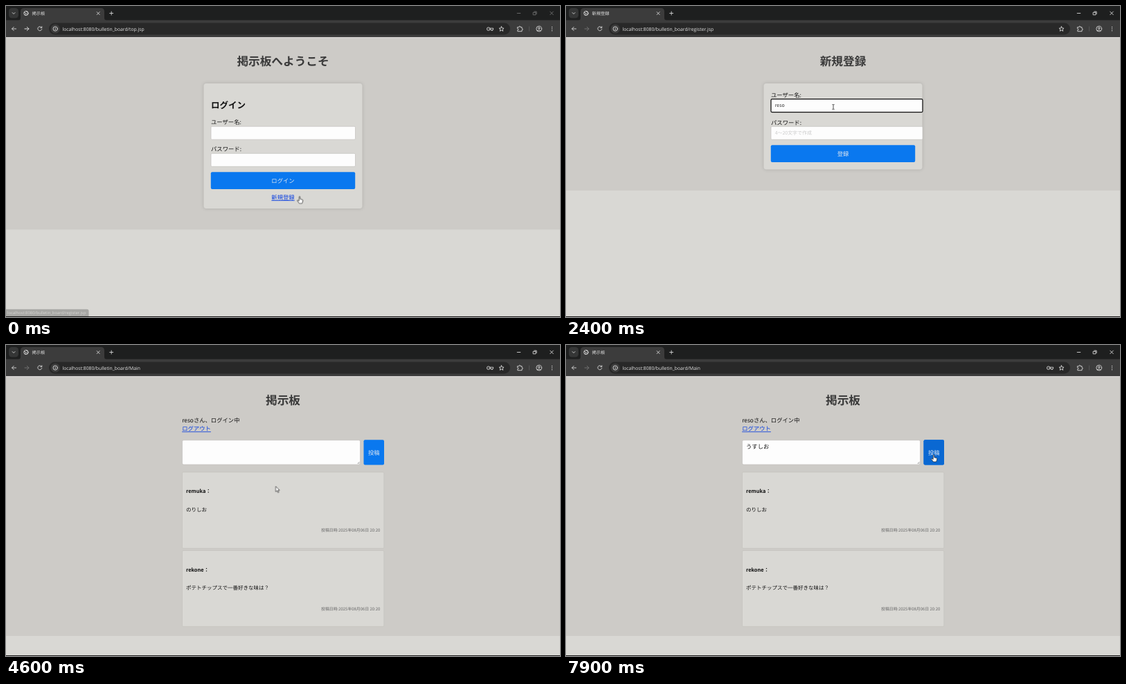
Animation of 800x450 px, one loop 8000 ms. Source, as an HTML page:

```html
<!DOCTYPE html>
<html>
<head>
<meta charset="utf-8">
<title>掲示板</title>
<style>
html, body { margin: 0; width: 100%; height: 100%; overflow: hidden; background: #d9d8d4; }
svg { display: block; width: 800px; height: 450px; }
text { font: 8.33px "Noto Sans CJK JP", "Noto Sans CJK", sans-serif; fill: #111; text-rendering: geometricPrecision; white-space: pre; }
.mid { text-anchor: middle; }
.h1 { font-size: 16.67px; font-weight: 700; fill: #3a3a3a; text-anchor: middle; }
.h2 { font-size: 12.5px; font-weight: 700; }
.tab { font-size: 6.25px; fill: #dedede; }
.url { font: 6.8px "Open Sans", "Noto Sans", sans-serif; fill: #e4e4e4; }
.tip { font-size: 5.87px; fill: #c8c8c8; }
.link { fill: #0a3fe0; text-decoration: underline; }
.label { fill: #e2e8f0; text-anchor: middle; }
.small { font-size: 6.94px; fill: #333; }
.hint { font-size: 6.94px; fill: #cbcbcb; }
.post { font-size: 7.5px; }
.name { font-size: 7.5px; font-weight: 700; }
.date { font-size: 5.92px; fill: #666; text-anchor: end; }
.shade { fill: #cdcbc7; }
.card { fill: #d9d8d4; filter: drop-shadow(0 0 2.6px rgba(0,0,0,.15)); }
.item { fill: #d9d8d4; stroke: #c1bfbb; stroke-width: .6; }
.box { fill: #fdfdfd; stroke: #c3c1bd; stroke-width: .7; }
.ring { fill: none; stroke: #101010; stroke-width: 1.2; }
.btn { fill: #0a78ef; }
.hov { fill: #0a68d2; }
.ico { fill: none; stroke: #d6d6d6; stroke-width: .9; stroke-linecap: round; stroke-linejoin: round; }
.ptr { fill: #fff; stroke: #222; stroke-width: .7; stroke-linejoin: round; }

/* one shared 8 s clock; each step lands just before its tenth of a second */
.k { animation: 8s step-end -30ms infinite; }
.move { animation: move 8s linear -30ms infinite; }
.tip-on { animation: tip 8s linear -30ms infinite; }

@keyframes top { 0% { opacity: 1 } 5%, to { opacity: 0 } }
@keyframes reg { 0% { opacity: 0 } 5% { opacity: 1 } 52.5%, to { opacity: 0 } }
@keyframes main { 0% { opacity: 0 } 52.5%, to { opacity: 1 } }
@keyframes wake { 0% { stroke: #707070 } 1.25%, to { stroke: #d6d6d6 } }
@keyframes key { 0% { opacity: 1 } 20% { opacity: 0 } 38.75%, to { opacity: 1 } }
@keyframes tip { 0% { opacity: 0 } 1.25%, 10% { opacity: 1 } 11.25%, to { opacity: 0 } }

@keyframes nameFocus { 0% { opacity: 0 } 15% { opacity: 1 } 37.5%, to { opacity: 0 } }
@keyframes nameCaret { 0% { opacity: 0 } 15% { opacity: 1; transform: none } 20% { opacity: 1; transform: translateX(3px) } 21.25%, to { opacity: 0 } }
@keyframes nameHint { 0% { opacity: 1 } 20%, to { opacity: 0 } }
@keyframes n1 { 0% { fill-opacity: 0 } 20%, to { fill-opacity: 1 } }
@keyframes n2 { 0% { fill-opacity: 0 } 21.25%, to { fill-opacity: 1 } }
@keyframes n3 { 0% { fill-opacity: 0 } 25%, to { fill-opacity: 1 } }
@keyframes n4 { 0% { fill-opacity: 0 } 26.25%, to { fill-opacity: 1 } }
@keyframes passFocus { 0% { opacity: 0 } 37.5%, to { opacity: 1 } }
@keyframes passHint { 0% { opacity: 1 } 38.75%, to { opacity: 0 } }
@keyframes p1 { 0% { opacity: 0 } 38.75%, to { opacity: 1 } }
@keyframes p2 { 0% { opacity: 0 } 40%, to { opacity: 1 } }
@keyframes p3 { 0% { opacity: 0 } 41.25%, to { opacity: 1 } }
@keyframes p4 { 0% { opacity: 0 } 42.5%, to { opacity: 1 } }
@keyframes regHover { 0% { opacity: 0 } 11.25% { opacity: 1 } 12.5% { opacity: 0 } 33.75% { opacity: 1 } 36.25% { opacity: 0 } 45%, to { opacity: 1 } }

@keyframes areaFocus { 0% { opacity: 0 } 63.75% { opacity: 1 } 98.75%, to { opacity: 0 } }
@keyframes k1 { 0% { opacity: 0 } 75%, to { opacity: 1 } }
@keyframes s2 { 0% { opacity: 0 } 76.25% { opacity: 1 } 77.5%, to { opacity: 0 } }
@keyframes k2 { 0% { opacity: 0 } 77.5%, to { opacity: 1 } }
@keyframes s3 { 0% { opacity: 0 } 78.75% { opacity: 1 } 81.25%, to { opacity: 0 } }
@keyframes k3 { 0% { opacity: 0 } 81.25%, to { opacity: 1 } }
@keyframes k4 { 0% { opacity: 0 } 83.75%, to { opacity: 1 } }
@keyframes compose {
  0% { width: 0 } 75% { width: 8.33px } 76.25% { width: 16.67px }
  78.75% { width: 25px } 83.75% { width: 33.3px } 92.5%, to { width: 0 }
}
@keyframes areaCaret {
  0% { opacity: 0 } 63.75% { opacity: 1; transform: none } 70% { opacity: 0 }
  75% { opacity: 1; transform: translateX(8.3px) } 76.25% { opacity: 1; transform: translateX(16.7px) }
  78.75% { opacity: 1; transform: translateX(25px) } 83.75% { opacity: 1; transform: translateX(33.3px) }
  86.25%, to { opacity: 0 }
}
@keyframes sendHover { 0% { opacity: 0 } 96.25%, to { opacity: 1 } }

@keyframes move {
  0% { transform: translate(428px, 275px) }
  1.25% { transform: translate(415px, 277px) }
  2.5%, 8.75% { transform: translate(406.5px, 278px) }
  10% { transform: translate(404px, 262px) }
  11.25% { transform: translate(398px, 213px) }
  12.5% { transform: translate(390px, 176px) }
  15%, 31.25% { transform: translate(386px, 146px) }
  32.5% { transform: translate(388px, 170px) }
  33.75%, 35% { transform: translate(391px, 212px) }
  36.25%, 43.75% { transform: translate(390px, 186px) }
  45%, 58.1% { transform: translate(389.5px, 204.5px) }
  60% { transform: translate(385px, 170px) }
  62.5%, 92.5% { transform: translate(377px, 149.5px) }
  96.25% { transform: translate(518px, 158px) }
  98.5%, to { transform: translate(531px, 159px) }
}
@keyframes hand {
  0% { opacity: 1 } 5% { opacity: 0 } 11.25% { opacity: 1 } 12.5% { opacity: 0 } 33.75% { opacity: 1 }
  36.25% { opacity: 0 } 45% { opacity: 1 } 52.5% { opacity: 0 } 96.25%, to { opacity: 1 }
}
@keyframes arrow { 0% { opacity: 0 } 5% { opacity: 1 } 11.25% { opacity: 0 } 52.5% { opacity: 1 } 60%, to { opacity: 0 } }
@keyframes beam {
  0% { opacity: 0 } 12.5% { opacity: 1 } 33.75% { opacity: 0 } 36.25% { opacity: 1 }
  45% { opacity: 0 } 60% { opacity: 1 } 96.25%, to { opacity: 0 }
}
</style>
</head>
<body>
<svg viewBox="0 0 800 450">
  <!-- browser frame -->
  <rect width="800" height="450" fill="#d9d8d4"/>
  <rect width="800" height="21" fill="#1e1f1f"/>
  <rect y="20.5" width="800" height="24.5" fill="#3c3c3c"/>
  <rect x="4" y="3" width="14" height="14.5" rx="4.5" fill="#353636"/>
  <path d="M17 21q4 0 4-4V8q0-5 5-5h111q5 0 5 5v9q0 4 4 4z" fill="#3c3c3c"/>
  <rect x="62" y="24.5" width="666" height="17" rx="8.5" fill="#282828"/>
  <circle cx="71.2" cy="33" r="6.6" fill="#3c3c3c"/>
  <g class="ico">
    <path d="M9.2 9.6l1.9 1.9 1.9-1.9M131.2 8.6l4 4m0-4l-4 4M149.7 10.5h5m-2.500-2.500v5"/>
    <circle cx="29" cy="10.500" r="3.200"/>
    <path d="M26.300 9.500q2.500 0 2.700 1.600t2.700.6M29.500 7.500q-.5 1.500 1.800 1.700M28 13.300v-1.500"/>
    <path d="M14.600 33H8.600m2.700-2.700L8.600 33l2.700 2.700"/>
    <path d="M51.500 31.300a3 3 0 1 0 .3 2.200M51.800 29.700v1.900h-1.900"/>
    <circle cx="71.200" cy="33" r="3.200"/>
    <path d="M71.200 32.800v1.700m0-3.200v.1"/>
    <path d="M715.500 29.700l1 2.300 2.500.2-1.900 1.600.6 2.500-2.200-1.300-2.200 1.300.6-2.500-1.900-1.600 2.500-.2z"/>
    <path d="M738.800 30.700h2q0-1.500 1-1.500t1 1.500h2.200v2q1.300 0 1.300 1t-1.300 1v2h-6.200v-2q1.300 0 1.300-1t-1.300-1z"/>
    <circle cx="769.700" cy="33" r="3.900"/>
    <circle cx="769.700" cy="32" r="1.200"/>
    <path d="M767.200 35.600q2.500-2 5 0"/>
    <path d="M788.500 30.300v.1m0 2.600v.1m0 2.600v.1" stroke-width="1.300"/>
  </g>
  <path d="M755.500 29.500v7" stroke="#5c5c5c" stroke-width=".8"/>
  <path class="ico" d="M27 33h6m-2.700-2.700L33 33l-2.700 2.700" style="stroke:#747474"/>
  <path class="ico k" style="animation-name:wake" d="M738.200 10.500h4.600M761.500 9.300h3.500v3.500h-3.500zM762.800 8.100h3.300v3.500M785.700 8.100l4.600 4.600m0-4.600l-4.600 4.600"/>
  <g class="ico k" style="animation-name:key">
    <circle cx="696.700" cy="33.200" r="2.300"/>
    <path d="M696.600 33.200h.1M699 32.200h4.600v2h-1v1.200h-1.700v-1.200H699"/>
  </g>

  <!-- login page -->
  <g class="k" style="animation-name:top">
    <path class="ico" d="M27 33h6m-2.700-2.700L33 33l-2.700 2.700"/>
    <text class="tab" x="37.500" y="12.700">掲示板</text>
    <text class="url" x="81.500" y="35.600">localhost:8080/bulletin_board/top.jsp</text>
    <rect class="shade" y="45" width="800" height="278.500"/>
    <text class="h1" x="400" y="86.300">掲示板へようこそ</text>
    <rect class="card" x="285.500" y="112" width="229" height="181" rx="4"/>
    <text class="h2" x="296" y="147.700">ログイン</text>
    <text x="296" y="171.300">ユーザー名:</text>
    <rect class="box" x="296" y="174.200" width="208.500" height="19" rx="1.500"/>
    <text x="296" y="210.400">パスワード:</text>
    <rect class="box" x="296" y="213.300" width="208.500" height="19" rx="1.500"/>
    <rect class="btn" x="295.800" y="240.300" width="208.400" height="24.800" rx="2"/>
    <text class="label" x="400" y="256.200">ログイン</text>
    <text class="link mid" x="400" y="280.200">新規登録</text>
  </g>

  <!-- sign-up page -->
  <g class="k" style="animation-name:reg">
    <text class="tab" x="37.500" y="12.700">新規登録</text>
    <text class="url" x="81.500" y="35.600">localhost:8080/bulletin_board/register.jsp</text>
    <rect class="shade" y="45" width="800" height="222"/>
    <text class="h1" x="400" y="86.300">新規登録</text>
    <rect class="card" x="285.500" y="112" width="229" height="124.500" rx="4"/>
    <rect class="box" x="296" y="134.700" width="219" height="19" rx="1.500"/>
    <rect class="box" x="296" y="174.300" width="219" height="19" rx="1.500"/>
    <text x="296" y="132.200">ユーザー名:</text>
    <text x="296" y="171.700">パスワード:</text>
    <rect class="ring k" style="animation-name:nameFocus" x="296" y="134.700" width="219" height="19" rx="1.800"/>
    <rect class="ring k" style="animation-name:passFocus" x="296" y="174.300" width="219" height="19" rx="1.800"/>
    <text class="hint k" style="animation-name:nameHint" x="301.700" y="146.800">1〜20文字で作成</text>
    <text class="hint k" style="animation-name:passHint" x="301.700" y="186.400">4〜20文字で作成</text>
    <text class="small" x="301.700" y="146.400"><tspan class="k" style="animation-name:n1">r</tspan><tspan class="k" style="animation-name:n2">e</tspan><tspan class="k" style="animation-name:n3">s</tspan><tspan class="k" style="animation-name:n4">o</tspan></text>
    <rect class="k" style="animation-name:nameCaret" x="301.500" y="140.200" width=".6" height="8"/>
    <g fill="#111">
      <circle class="k" style="animation-name:p1" cx="303.100" cy="183.500" r="1"/>
      <circle class="k" style="animation-name:p2" cx="305.700" cy="183.500" r="1"/>
      <circle class="k" style="animation-name:p3" cx="308.300" cy="183.500" r="1"/>
      <circle class="k" style="animation-name:p4" cx="310.900" cy="183.500" r="1"/>
    </g>
    <rect class="btn" x="295.800" y="201.200" width="208.400" height="24.700" rx="2"/>
    <rect class="hov k" style="animation-name:regHover" x="295.800" y="201.200" width="208.400" height="24.700" rx="2"/>
    <text class="label" x="400" y="217.100">登録</text>
  </g>

  <!-- board page -->
  <g class="k" style="animation-name:main">
    <text class="tab" x="37.500" y="12.700">掲示板</text>
    <text class="url" x="81.500" y="35.600">localhost:8080/bulletin_board/Main</text>
    <rect class="shade" y="45" width="800" height="376"/>
    <text class="h1" x="400" y="86.300">掲示板</text>
    <text x="254.200" y="112.100">resoさん、ログイン中</text>
    <text class="link" x="254.200" y="124.300">ログアウト</text>
    <rect class="box" x="254.500" y="137.700" width="257" height="35.300" rx="2"/>
    <path d="M507.700 171.800l2.700-2.700m-1 2.700l1-1" stroke="#555" stroke-width=".6"/>
    <rect class="ring k" style="animation-name:areaFocus" x="254.500" y="137.700" width="257" height="35.300" rx="2"/>
    <text class="k" style="animation-name:k1" x="260" y="150.200">う</text>
    <text class="k" style="animation-name:s2" x="268.300" y="150.200">ｓ</text>
    <text class="k" style="animation-name:k2" x="268.300" y="150.200">す</text>
    <text class="k" style="animation-name:s3" x="276.700" y="150.200">ｓ</text>
    <text class="k" style="animation-name:k3" x="276.700" y="150.200">し</text>
    <text class="k" style="animation-name:k4" x="285" y="150.200">お</text>
    <rect class="k" style="animation-name:compose" x="260" y="151" width="0" height=".6" fill="#222"/>
    <rect class="k" style="animation-name:areaCaret" x="260" y="142.200" width=".6" height="9.300"/>
    <rect class="btn" x="516.500" y="137.200" width="29.500" height="36.300" rx="2"/>
    <rect class="hov k" style="animation-name:sendHover" x="516.500" y="137.200" width="29.500" height="36.300" rx="2"/>
    <text class="label" x="531.300" y="159">投稿</text>

    <rect class="item" x="254.500" y="184" width="291.300" height="110.200" rx="1.500"/>
    <text class="name" x="260" y="214.100">remuka：</text>
    <text class="post" x="260" y="240.600">のりしお</text>
    <text class="date" x="540.300" y="270.400">投稿日時:2025年08月06日 20:20</text>
    <rect class="item" x="254.500" y="297.500" width="291.300" height="109.800" rx="1.500"/>
    <text class="name" x="260" y="327.700">rekone：</text>
    <text class="post" x="260" y="354.200">ポテトチップスで一番好きな味は？</text>
    <text class="date" x="540.300" y="383.800">投稿日時:2025年08月06日 20:20</text>
  </g>

  <rect y="45" width="800" height="1.300" fill="#d7d4d3"/>
  <rect y="449" width="800" height="1" fill="#1c1c1c"/>
  <g class="tip-on">
    <path d="M0 438.700h117q2.500 0 2.500 2.500V449H0z" fill="#3c3c3c"/>
    <text class="url tip" x="2" y="446.300">localhost:8080/bulletin_board/register.jsp</text>
  </g>

  <!-- pointer, hot spot at 0,0 -->
  <g class="move">
    <path class="ptr k" style="animation-name:arrow" d="M0 0v7.900l1.900-1.700 1.300 2.900 1.300-.6-1.300-2.800h2.500z"/>
    <path class="ptr k" style="animation-name:hand" d="M-.8.800q0-.9.800-.9t.8.900v3l3.200.7q.9.300.8 1.300l-.5 2.600-.8 1.600H-.5L-3.300 6.400q-.4-.9.400-1.100l2.100 1.200z"/>
    <path class="k" style="animation-name:beam" d="M-1.600-3.400h1.100l.5.400.5-.4h1.100M0-3v6M-1.600 3.400h1.100L0 3l.5.400h1.100" fill="none" stroke="#222" stroke-width=".8"/>
  </g>
</svg>
</body>
</html>
```
